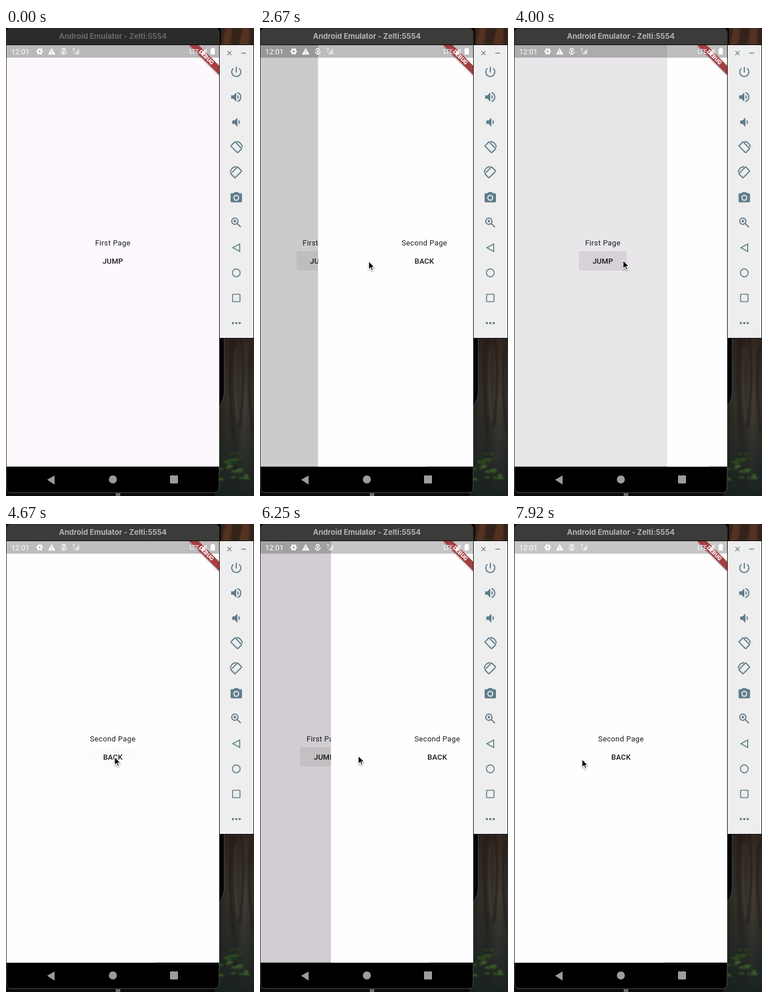
Recreate the animation shown at these times as an HTML page. Size 434 px wide and 820 px high, loop 8000 ms.

```html
<!DOCTYPE html>
<html lang="en">
<head>
<meta charset="utf-8">
<title>Page transition</title>
<style>
  html, body { margin: 0; width: 100%; height: 100%; overflow: hidden; background: #0b0a09; }
  svg { display: block; }
  text { font: 13px Roboto, sans-serif; }
  .label { fill: #1d1b20; text-anchor: middle; letter-spacing: .36px; }
  .button { fill: #1d1b20; text-anchor: middle; font-weight: 500; letter-spacing: .2px; }
  .line { fill: none; stroke: #607d8b; stroke-width: 2; }
  .fill { fill: #607d8b; }
</style>
</head>
<body>
<svg width="434" height="820" viewBox="0 0 434 820">
  <defs>
    <clipPath id="screen"><rect x="1" y="30" width="372" height="738.500"/></clipPath>
    <clipPath id="key"><rect x="145" y="391" width="84" height="34" rx="3"/></clipPath>
    <linearGradient id="bark">
      <stop offset="0" stop-color="#1d1a17"/><stop offset=".3" stop-color="#35302b"/>
      <stop offset=".5" stop-color="#2d2925"/><stop offset=".75" stop-color="#48413a"/>
      <stop offset="1" stop-color="#332e29"/>
    </linearGradient>
    <linearGradient id="shade" x2="0" y2="1">
      <stop offset="0" stop-color="#24150e" stop-opacity=".6"/><stop offset=".4" stop-color="#24211d" stop-opacity=".1"/>
      <stop offset=".7" stop-color="#1c2522" stop-opacity=".6"/><stop offset="1" stop-color="#18211f" stop-opacity=".95"/>
    </linearGradient>
    <filter id="soft" x="-50%" y="-50%" width="200%" height="200%"><feGaussianBlur stdDeviation="1.5"/></filter>
    <filter id="drop" x="-50%" y="-50%" width="200%" height="200%">
      <feDropShadow dx="0" dy="1.5" stdDeviation="1.2" flood-opacity=".4"/>
    </filter>
  </defs>

  <!-- desktop -->
  <rect width="434" height="820" fill="#0b0b0a"/>
  <rect x="374" width="60" height="30" fill="#33231a"/>
  <path d="M384 0h12l-4 30h-14zM414 0h12v30h-18z" fill="#533320" filter="url(#soft)"/>
  <rect x="366" y="540" width="68" height="280" fill="url(#bark)"/>
  <g filter="url(#soft)" fill="none" stroke="#211d19" stroke-width="3">
    <path d="M395 544Q388 620 399 720M412 544Q420 610 409 700M428 560Q422 640 432 710"/>
    <path d="M403 560Q398 620 405 690" stroke="#4c443b"/>
  </g>
  <rect x="366" y="540" width="68" height="280" fill="url(#shade)"/>
  <g id="leaves" filter="url(#soft)"></g>
  <path d="M366 540H382V636Q382 653 372 665" fill="#050505" stroke="#55524f"/>
  <rect x="192" y="815" width="8" height="5" fill="#6c6a68"/>
  <rect x="371" width="5" height="30" fill="#050505"/>

  <!-- emulator window -->
  <path d="M1 9Q1 1 9 1H365Q373 1 373 9V806Q373 814 365 814H9Q1 814 1 806Z" fill="#000" stroke="#555451"/>
  <path id="bar" d="M1.5 29V9Q1.5 1.5 9 1.5H365Q372.5 1.5 372.5 9V29Z"/>
  <text id="title" x="187" y="19" text-anchor="middle" style="font:700 13px Inter,sans-serif">Android Emulator - Zelti:5554</text>

  <g clip-path="url(#screen)">
    <g id="first">
      <rect x="1" y="30" width="372" height="739" fill="#fcf8fd"/>
      <g class="press" clip-path="url(#key)"><rect x="145" y="391" width="84" height="34" fill-opacity=".05"/><circle fill-opacity=".05"/></g>
      <text class="label" x="187" y="381">First Page</text>
      <text class="button" x="187" y="413">JUMP</text>
    </g>
    <rect id="dim" x="1" y="30" width="372" height="739"/>
    <g id="second">
      <rect x="1" y="30" width="373" height="739" fill="#fefefe"/>
      <g class="press" clip-path="url(#key)"><rect x="145" y="391" width="84" height="34" fill-opacity=".05"/><circle fill-opacity=".05"/></g>
      <text class="label" x="187" y="381">Second Page</text>
      <text class="button" x="187" y="413">BACK</text>
    </g>
    <rect id="status" x="1" y="30" width="372" height="22"/>
    <path d="M321 30H337L373 66V82Z" fill="#a63c40" filter="url(#drop)"/>
    <text transform="translate(350.5 51.5) rotate(45)" y="3" text-anchor="middle" fill="#fff" style="font-size:10px;font-weight:900">DEBUG</text>
    <g fill="#fff">
      <text x="9" y="45.5">12:01</text>
      <circle cx="59" cy="41" r="3.3" fill="none" stroke="#fff" stroke-width="2.6"/>
      <circle cx="59" cy="41" r="5" fill="none" stroke="#fff" stroke-width="1.8" stroke-dasharray="2.6 2.636" stroke-dashoffset="1.3"/>
      <path d="M80 35L86.5 46.5H73.5ZM79.3 39V43H80.7V39ZM79.3 44V45.4H80.7V44Z" fill-rule="evenodd"/>
      <g fill="none" stroke="#fff" stroke-width="1.4">
        <path d="M101 41.5L98.6 39A1.7 1.7 0 0 1 101 36.6A1.7 1.7 0 0 1 103.4 39ZM96.5 41Q97 45.5 101 46Q105 45.5 105.5 41M101 42V46"/>
      </g>
      <text x="116" y="43" style="font-size:10px">?</text>
      <path d="M119 46L128 36V46Z" opacity=".45"/>
      <path d="M121 46V43.5M124 46V40.5M127 46V37" stroke="#fff" opacity=".7"/>
      <text x="321" y="45" style="font-size:11.5px;letter-spacing:-.5px">LTE</text>
      <path d="M341 46L351.5 35V46Z" opacity=".5"/>
      <path d="M341 46L347 39.5V46ZM346 37L351 42M351 37L346 42" stroke="#fff"/>
      <path d="M358 36H360V34.5H363.500V36H365.500V46.500H358Z"/>
    </g>
  </g>
  <g fill="#9c9c9c">
    <path d="M72 791.500L85 784V800Z"/><circle cx="187" cy="791" r="7"/><rect x="287" y="784" width="14" height="14" rx="1"/>
  </g>

  <!-- control panel -->
  <rect x="373.500" y="29.500" width="60" height="514" fill="#eee" stroke="#0a0a0a"/>
  <path class="line" d="M387.500 40.500L394.500 47.500M394.500 40.500L387.500 47.500M412 44H420" style="stroke-width:1.3"/>
  <g id="tools">
    <path class="line" d="M0 -9V1M-5 -6.200A8 8 0 1 0 5 -6.200"/>
    <g><path class="fill" d="M-9 -3H-5L0 -8V8L-5 3H-9ZM2 -4A4.500 4.500 0 0 1 2 4Z"/><path class="line" d="M2 -7.700A8 8 0 0 1 2 7.700"/></g>
    <path class="fill" d="M-7 -3H-3L2 -8V8L-3 3H-7ZM4 -4A4.500 4.500 0 0 1 4 4Z"/>
    <g id="turn"><rect class="line" x="-5.200" y="-8.500" width="10.400" height="17" rx="1" transform="rotate(-45)"/><path class="line" d="M0 -10A10.500 10.500 0 0 1 10.500 0" style="stroke-width:1.800"/></g>
    <use href="#turn"/>
    <g><path class="fill" d="M-3 -9.500H3L5 -7.500H8Q10 -7.500 10 -5.500V6.500Q10 8.500 8 8.500H-8Q-10 8.500 -10 6.500V-5.500Q-10 -7.500 -8 -7.500H-5Z"/><circle cy=".5" r="4.200" fill="#607d8b" stroke="#eee" stroke-width="1.900"/></g>
    <path class="line" d="M3 -2.500A5.500 5.500 0 1 1 -8 -2.500A5.500 5.500 0 1 1 3 -2.500M1.800 1.800L8 8M-5 -2.500H0M-2.500 -5V0"/>
    <path class="line" d="M6 -6.500V6.500L-6 0Z" style="stroke-width:1.700"/>
    <circle class="line" r="6.800" style="stroke-width:1.700"/>
    <rect class="line" x="-6.500" y="-6.500" width="13" height="13" rx="1" style="stroke-width:1.700"/>
    <g class="fill"><circle cx="-6" r="2"/><circle r="2"/><circle cx="6" r="2"/></g>
  </g>

  <path id="cursor" d="M0 0V14.500L3.400 11.500L5.600 16.600L8 15.500L5.800 10.500H10.400Z" stroke="#fff" stroke-width="1.200" filter="url(#drop)"/>
</svg>
<script>
const LOOP = 8000, WIDTH = 372, PUSH_MS = 500, PARALLAX = .3;
const $ = id => document.getElementById(id);
const clamp = v => Math.max(0, Math.min(1, v));

// start time, 1 = second page slides in, 0 = it slides out
const moves = [[2518, 1], [3320, 0], [3947, 1], [4770, 0], [6115, 1], [6770, 0], [7430, 1]];
// time, x, y of the pointer tip
const pointer = [
  [670, 432, 610], [1420, 257, 450], [1670, 255, 448], [1920, 199, 429], [2420, 190, 409],
  [3920, 191, 407], [4580, 190, 408], [5420, 190, 408], [5580, 169, 406], [5750, 172, 406],
  [7420, 172, 406], [7600, 165, 408], [7900, 119, 412]
];

function bezier(x1, y1, x2, y2) {
  const at = (a, b, s) => 3 * a * s * (1 - s) ** 2 + 3 * b * s * s * (1 - s) + s ** 3;
  return x => {
    let lo = 0, hi = 1;
    for (let i = 0; i < 24; i++) {
      const mid = (lo + hi) / 2;
      if (at(x1, x2, mid) < x) lo = mid; else hi = mid;
    }
    return at(y1, y2, lo);
  };
}
const slide = bezier(.35, .91, .33, .97);

function pointerAt(t) {
  const i = pointer.findIndex(p => p[0] > t);
  if (i < 0) return pointer[pointer.length - 1].slice(1);
  if (i === 0) return [-50, -50];
  const [t0, x0, y0] = pointer[i - 1], [t1, x1, y1] = pointer[i];
  const k = (t - t0) / (t1 - t0);
  return [x0 + (x1 - x0) * k, y0 + (y1 - y0) * k];
}

function drawPress(page, forward, t, [x, y]) {
  const group = $(page).querySelector('.press'), ripple = group.querySelector('circle');
  const move = moves.find(m => m[1] === forward && t > m[0] - 110 && t < m[0] + 450);
  const age = move ? t - move[0] + 110 : 0;
  group.setAttribute('opacity', move ? clamp(age / 60) * clamp((560 - age) / 450) : 0);
  ripple.setAttribute('cx', clamp((x - 145) / 84) * 84 + 145);
  ripple.setAttribute('cy', y);
  ripple.setAttribute('r', 12 + age * .35);
}

function draw(t) {
  const active = t >= 900;
  $('bar').setAttribute('fill', active ? '#3b3b39' : '#2a2a29');
  $('title').setAttribute('fill', active ? '#b5b4b2' : '#6b6a69');

  let shown = 0;
  const move = moves.filter(m => m[0] <= t).pop();
  if (move) {
    const p = slide(clamp((t - move[0]) / PUSH_MS));
    shown = move[1] ? p : 1 - p;
  }
  $('first').setAttribute('transform', `translate(${-shown * WIDTH * PARALLAX} 0)`);
  $('second').setAttribute('transform', `translate(${(1 - shown) * WIDTH} 0)`);
  $('dim').setAttribute('fill-opacity', .26 * shown);
  $('status').setAttribute('fill-opacity', t < 5000 ? .26 : .22);

  const tip = pointerAt(t);
  drawPress('first', 1, t, tip);
  drawPress('second', 0, t, tip);
  $('cursor').setAttribute('transform', `translate(${tip})`);
}

[...$('tools').children].forEach((icon, i) => {
  icon.setAttribute('transform', `translate(403 ${77 + 44 * i})`);
});
// the second rotate icon mirrors the first, one row down
$('tools').querySelector('use').setAttribute('transform', 'translate(806 44) scale(-1 1)');

let seed = 7;
const random = () => (seed = seed * 16807 % 2147483647) / 2147483647;
$('leaves').innerHTML = Array.from({ length: 22 }, () => {
  const x = 376 + random() * 48, y = 737 + random() * 58;
  return `<ellipse cx="${x}" cy="${y}" rx="${3 + random() * 4}" ry="2" fill="hsl(${80 + random() * 30} 40% ${16 + random() * 13}%)"/>`;
}).join('');

function tick() {
  draw(performance.now() % LOOP);
  requestAnimationFrame(tick);
}
tick();
</script>
</body>
</html>
```
